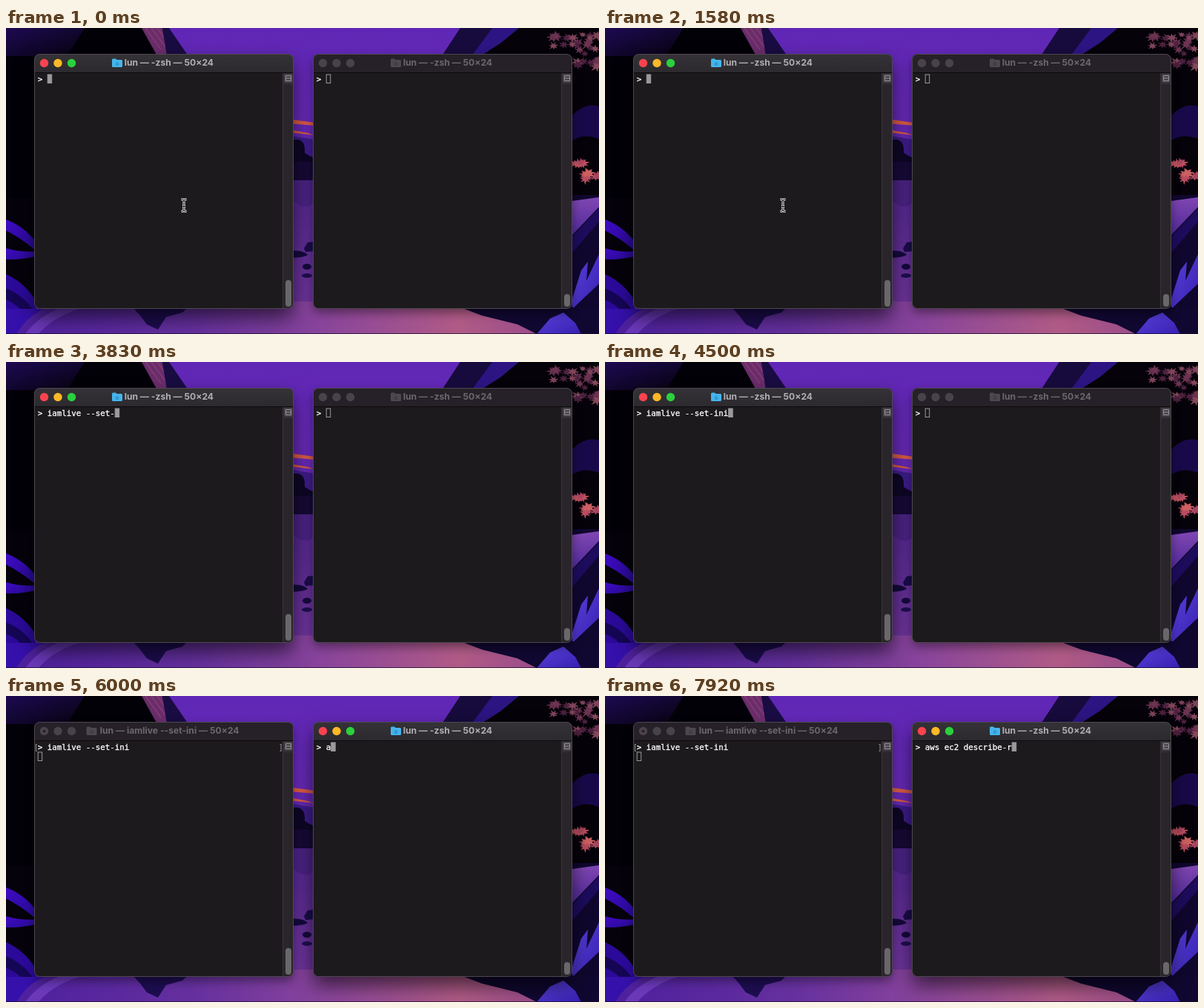
An HTML page that plays this animation: 800 by 414 pixels, repeating every 8 s.

```html
<!DOCTYPE html>
<html lang="en">
<head>
<meta charset="utf-8">
<title>Two terminals</title>
<style>
  html, body { margin: 0; width: 100%; height: 100%; overflow: hidden; background: #0a0514; }
  svg { display: block; }
  .mono { font: 500 10.8px "DejaVu Sans Mono", monospace; }
  .line { fill: #fff; stroke: #fff; stroke-width: .3; }
  .title { font: 700 12.1px Inter, sans-serif; fill: #b1afb3; text-anchor: end; }
  .bar { fill: url(#bar); }
  .frame { filter: drop-shadow(0 12px 13px rgba(0,0,0,.6)); }
  .folder { fill: #45b5ec; }
  .glyph { fill: #309bd3; }
  .caret { fill: #9b999b; stroke: #9b999b; }
  .mark { fill: #99979b; }
  .red { fill: #f8434f; }
  .amber { fill: #fdb827; }
  .green { fill: #2bd03d; }
  .idle .bar { fill: #262128; }
  .idle .frame { filter: drop-shadow(0 6px 7px rgba(0,0,0,.42)); }
  .idle .title { fill: #6c666e; }
  .idle .folder { fill: #4d484f; }
  .idle .glyph { fill: #423e44; }
  .idle .caret { fill: none; }
  .idle .light { fill: #48434a; }
</style>
</head>
<body>
<svg width="800" height="414" viewBox="0 0 800 414">
  <defs>
    <linearGradient id="sky" x2="0" y2="1">
      <stop offset="0" stop-color="#6027b6"/><stop offset=".34" stop-color="#6629b4"/>
      <stop offset=".6" stop-color="#57298f"/><stop offset="1" stop-color="#73379b"/>
    </linearGradient>
    <linearGradient id="ground" x1="0" x2="720" y1="0" y2="0" gradientUnits="userSpaceOnUse">
      <stop offset="0" stop-color="#4c1f9e"/><stop offset=".35" stop-color="#65309e"/>
      <stop offset=".6" stop-color="#8a459b"/><stop offset=".85" stop-color="#b05b86"/>
      <stop offset="1" stop-color="#9a4c8a"/>
    </linearGradient>
    <linearGradient id="dusk" x2="1" y2="1">
      <stop offset="0" stop-color="#1c0a52"/><stop offset="1" stop-color="#07030f"/>
    </linearGradient>
    <linearGradient id="blade" x2="1" y2="1">
      <stop offset="0" stop-color="#3f0bc4"/><stop offset="1" stop-color="#270a91"/>
    </linearGradient>
    <linearGradient id="gem" x2="1" y2="1">
      <stop offset="0" stop-color="#5a43dc"/><stop offset="1" stop-color="#371fb0"/>
    </linearGradient>
    <linearGradient id="haze" x2="0" y2="1">
      <stop offset="0" stop-color="#8047b2"/><stop offset="1" stop-color="#51299a"/>
    </linearGradient>
    <linearGradient id="bar" x2="0" y2="1">
      <stop offset="0" stop-color="#343236"/><stop offset="1" stop-color="#2c2a2e"/>
    </linearGradient>
  </defs>

  <rect width="800" height="414" fill="url(#sky)"/>
  <path d="M0 370H720V414H0Z" fill="url(#ground)"/>

  <!-- left cliffs -->
  <path d="M0 0H218L245 38V260H0Z" fill="#030108"/>
  <path d="M0 0H106L82 38H0Z" fill="url(#dusk)"/>
  <path d="M183 0H211L218 36H203Z" fill="#6a2d6c"/>
  <path d="M188 0L209 29M196 0L216 27M204 0L214 14" stroke="#8e4270" stroke-width="1.2"/>
  <path d="M211 0H220L246 38H217Z" fill="#190c42"/>

  <!-- left foliage -->
  <path d="M0 230H40V380H0Z" fill="#05020b"/>
  <path d="M0 259Q24 268 40 289V301Q20 284 0 274Z" fill="url(#blade)"/>
  <path d="M0 298Q22 304 40 302V309Q20 314 0 313Z" fill="url(#blade)"/>
  <path d="M0 333Q26 345 40 369V381H0Z" fill="#2b0a9a"/>
  <path d="M0 352Q24 362 36 381H20Q12 372 0 368Z" fill="#150655"/>
  <path d="M0 380H52Q28 390 14 414H0Z" fill="#3510ab"/>
  <path d="M70 380H98Q62 392 44 414H26Q42 392 70 380Z" fill="#6a38b8"/>
  <path d="M171 378H245L238 385L216 391L205 408L190 401L181 389Z" fill="#1c0d4e"/>

  <!-- middle distance -->
  <path d="M380 123L416 128V132L380 129ZM380 137L407 142L416 145L380 141Z" fill="#d85b45"/>
  <path d="M380 145L416 151V184H380Z" fill="#3d1c88"/>
  <path d="M380 151H394Q404 153 403 169Q410 174 416 176V207H380Z" fill="#0e0726"/>
  <path d="M380 181H416V208H380Z" fill="#170a36"/>
  <path d="M380 206H416V236L407 242L398 241L380 230Z" fill="#4a2382"/>
  <path d="M402 298L407 290L416 289V302L404 303Z" fill="#1a0d4a"/>
  <path d="M380 301Q402 300 407 307Q401 311 380 311Z" fill="#150a3c"/>
  <ellipse cx="406" cy="323" rx="6" ry="4" fill="#150a3c"/>
  <ellipse cx="406" cy="335" rx="7" ry="3" fill="#1f0f4f"/>

  <!-- right cliffs -->
  <path d="M613 0H800V260H760V38H588Z" fill="#050209"/>
  <path d="M613 0H668L640 38H588Z" fill="#160b3c"/>
  <path d="M656 0H692L668 20L640 38H628Z" fill="#2c1582"/>
  <path d="M764 118Q782 100 800 106V150Q780 142 764 152Z" fill="#180a4a"/>
  <g id="leaves"></g>

  <!-- right foreground -->
  <path d="M760 226H800V414H760Z" fill="#10072e"/>
  <path d="M764 234L800 229V242L764 280Z" fill="url(#haze)"/>
  <path d="M764 282L800 244V262L764 304Z" fill="#1d0c5c"/>
  <path d="M764 366L776 328L785 316L783 342L800 306V346L764 380Z" fill="url(#gem)"/>
  <path d="M613 378H800V414H716L690 401L642 389Z" fill="#100830"/>
  <path d="M716 414L734 393L752 385L768 399L776 414Z" fill="url(#gem)"/>

  <g id="windows"></g>
  <path id="ibeam" d="M-3.5 -8H-1.5L0 -6.5L1.5 -8H3.5M0 -6.5V6.5M-3.5 8H-1.5L0 6.5L1.5 8H3.5M-2 1.5H2" fill="none"/>
  <path id="arrow" d="M0 0V14.2L3.3 11.2L5.6 16.5L8 15.4L5.7 10.3H10Z" fill="#080808" stroke="#fff" stroke-width="1.2"/>
  <path d="M0 413.5H800" stroke="#150a2c" stroke-opacity=".7"/>
</svg>

<script>
const LOOP = 8000, STEP = 1000 / 12, CELL = 6.5;
const ENTER = 4580, MOVE = 4660, ARRIVE = 5160, CLICK = 5410, TYPE_RIGHT = 5910;
const $ = id => document.getElementById(id);

let seed = 17;
const random = () => (seed = seed * 16807 % 2147483647) / 2147483647;

function leaf(x, y, size, color) {
  const turn = random() * 6.28;
  const points = Array.from({ length: 14 }, (_, i) => {
    const r = i % 2 ? size * .4 : size * (.75 + random() * .35);
    const a = turn + i * Math.PI / 7;
    return `${(x + r * Math.cos(a)).toFixed(1)},${(y + r * Math.sin(a) * .8).toFixed(1)}`;
  });
  return `<polygon points="${points.join(" ")}" fill="${color}"/>`;
}

function leafCluster(count, x, y, w, h, colors) {
  return Array.from({ length: count }, (_, i) =>
    leaf(x + random() * w, y + random() * h, 6 + random() * 4, colors[i % colors.length])).join("");
}

$("leaves").innerHTML =
  leafCluster(18, 738, 8, 60, 20, ["#6b3350", "#4c213f", "#7d4358"]) +
  leafCluster(12, 770, 22, 30, 30, ["#6b3350", "#84485a", "#4c203f"]) +
  leafCluster(6, 766, 181, 14, 6, ["#a84560", "#c0525f"]) +
  leafCluster(9, 778, 196, 22, 9, ["#b84c5e", "#a84560", "#cc6062"]);

function windowMarkup(id, x, thumbTop) {
  const lights = ["red", "amber", "green"].map((name, i) =>
    `<circle class="light ${name}" cx="${51.5 + i * 18.5}" cy="47.5" r="5.7"/>`).join("");
  return `<g id="${id}" transform="translate(${x})">
    <rect class="frame" x="38.5" y="35.5" width="349" height="344" rx="7" fill="#1c1a1c"/>
    <path class="bar" d="M38.5 60V42.5Q38.5 35.5 45.5 35.5H380.5Q387.5 35.5 387.5 42.5V60Z"/>
    <path d="M38.5 60.5H387.5" stroke="#0d0b0e"/>
    <path d="M374 61H387V373Q387 379 381 379H374Z" fill="#29252b"/>
    <path d="M373.5 61V379M374 75.5H387" stroke="#39343b"/>
    <rect x="375" y="62" width="11.5" height="12" fill="#48434a"/>
    <path d="M377.5 64.5H384.5V71.5H377.5ZM377.5 68H384.5" fill="none" stroke="#959196"/>
    <rect x="377" y="${thumbTop}" width="8" height="${377 - thumbTop}" rx="4" fill="#6a676b"/>
    <rect x="38.5" y="35.5" width="349" height="344" rx="7" fill="none" stroke="#4d484f"/>
    ${lights}
    <circle class="dot" cx="51.5" cy="47.5" r="1.8" fill="#32151b"/>
    <g class="icon">
      <path class="folder" d="M0 43Q0 41.5 1.5 41.5H5L6.5 43H12.5Q14 43 14 44.5V51.5Q14 53 12.5 53H1.5Q0 53 0 51.5Z"/>
      <path class="glyph" d="M4 48.3L7 45.6L10 48.3H9.2V51H4.8V48.3Z"/>
    </g>
    <text class="title" y="51.4"></text>
    <g class="mark mono"><text x="37.5" y="73">[</text><text x="367.5" y="73">]</text></g>
    <text class="mono line" x="42.7" y="73"></text>
    <rect class="caret" width="5.5" height="11.5"/>
  </g>`;
}

$("windows").innerHTML = windowMarkup("left", 0, 341) + windowMarkup("right", 376, 360);

for (const [color, width] of [["#fff", 3], ["#111", 1.1]]) {
  const stroke = $("ibeam").cloneNode();
  stroke.removeAttribute("id");
  stroke.setAttribute("stroke", color);
  stroke.setAttribute("stroke-width", width);
  stroke.classList.add("beam");
  $("ibeam").before(stroke);
}
$("ibeam").remove();
const beams = document.querySelectorAll(".beam");

const show = (node, on) => node.setAttribute("visibility", on ? "visible" : "hidden");
const place = (node, x, y) => node.setAttribute("transform", `translate(${x} ${y})`);

function updateWindow(id, { active, running, text }) {
  const win = $(id), part = name => win.querySelector("." + name);
  win.setAttribute("class", active ? "" : "idle");
  part("title").textContent = `lun — ${running ? "iamlive --set-ini" : "-zsh"} — 50×24`;
  part("title").setAttribute("x", running ? 314.5 : 280);
  place(part("icon"), running ? 108.5 : 143, 0);
  show(part("dot"), running);
  show(part("mark"), running);
  part("line").textContent = "> " + text;
  part("caret").setAttribute("x", 43.2 + (running ? 0 : (2 + text.length) * CELL));
  part("caret").setAttribute("y", running ? 76 : 63);
}

// Interpolates between [time, value] pairs.
function along(keys, t) {
  if (t <= keys[0][0]) return keys[0][1];
  for (let i = 1; i < keys.length; i++) {
    const [t0, a] = keys[i - 1], [t1, b] = keys[i];
    if (t < t1) return a + (b - a) * (t - t0) / (t1 - t0);
  }
  return keys.at(-1)[1];
}

const leftTyping = [[1700, 0], [2830, 8], [3080, 8], [3800, 14], [4230, 17]];

function updatePointer(t) {
  const k = Math.min(1, Math.max(0, (t - MOVE) / (ARRIVE - MOVE)));
  const ease = k * k * (3 - 2 * k);
  const x = 240 + 328.5 * ease, y = 240 - 74.5 * ease;
  const visible = t < 1800 || (t >= MOVE && t < TYPE_RIGHT);
  const isBeam = x < 374 || t >= CLICK;
  beams.forEach(beam => { place(beam, x, y); show(beam, visible && isBeam); });
  place($("arrow"), x, y);
  show($("arrow"), visible && !isBeam);
}

function draw(now) {
  // Steps begin on times rounded to 10 ms.
  const t = Math.floor((now % LOOP + 5) / STEP) * STEP;
  const leftCount = Math.floor(along(leftTyping, t) + .001);
  const rightCount = t < TYPE_RIGHT ? 0 : 1 + Math.floor((t - TYPE_RIGHT) / 115);
  updateWindow("left", {
    active: t < CLICK,
    running: t >= ENTER,
    text: "iamlive --set-ini".slice(0, leftCount)
  });
  updateWindow("right", {
    active: t >= CLICK,
    running: false,
    text: "aws ec2 describe-r".slice(0, rightCount)
  });
  updatePointer(t);
}

const start = performance.now();
function tick() {
  draw(performance.now() - start);
  requestAnimationFrame(tick);
}
tick();
</script>
</body>
</html>
```
